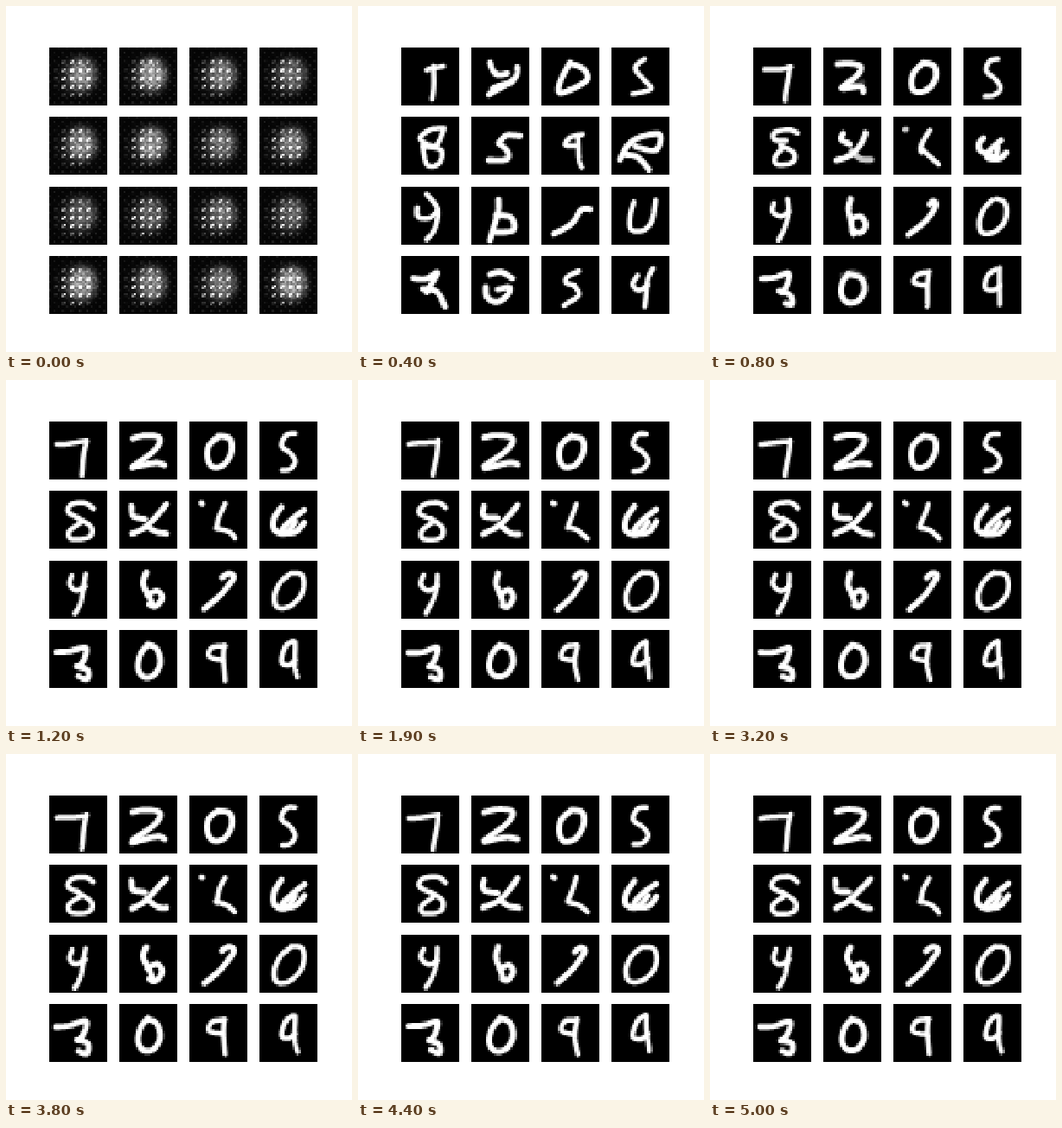
Animation of 400 by 400 pixels, one loop 5600 ms. Source, as an HTML page with a canvas:

```html
<!DOCTYPE html>
<html lang="en">
<head>
<meta charset="utf-8">
<title>Digits taking shape</title>
<style>
  html, body { margin: 0; width: 100%; height: 100%; overflow: hidden; background: #fff; }
  canvas { display: block; width: 400px; height: 400px; }
</style>
</head>
<body>
<canvas id="stage" width="400" height="400"></canvas>
<script>
const LOOP = 5600, STEP = 100, LAST = 50;
const SIDE = 67, PITCH_X = 81, PITCH_Y = 80.4, LEFT = 50, TOP = 48;
const CELLS = 28, SAMPLES = 24;
const FORMED = 4, SETTLED = 14;

// Each digit starts as a rough scrawl and settles into a clean one; "|" splits strokes.
const DIGITS = [
  digit(6, '29,26 38,24 48,21|38,22 36,60', '9,26 24,25 43,23|43,22 40,42 37,62'),
  digit(7, '22,18 28,30 42,30|53,22 48,38 20,55|24,48 46,40', '15,19 30,16 47,19 42,32 15,52|15,54 42,48 53,50'),
  digit(7, '33,18 48,24 53,36 40,46 22,53 22,40 33,18', '34,17 47,20 49,34 41,49 28,53 21,44 22,28 34,17'),
  digit(6, '38,13 28,24 38,38 45,48 24,53', '41,14 31,15 25,27 36,36 42,46 36,55 26,57'),
  digit(6, '50,14 34,15 21,25 40,33 50,14|24,34 46,38 44,54 30,56 24,34', '51,20 42,14 26,16 21,25 34,32|34,32 48,42 46,54 26,56 23,47 36,37'),
  digit(7, '56,22 42,21 32,30|32,30 42,40 40,50 20,50', '14,18 15,29 30,32|54,16 44,28 30,42 14,50|32,40 44,48 55,50'),
  digit(6, '48,20 34,24 27,33 40,33|42,22 43,44 47,58', '41,15 35,29 31,43|31,43 44,47 53,55|13,14 15,15'),
  digit(7, '10,50 18,34 32,24 56,20 52,38 28,34|16,44 30,46 43,62', '26,18 17,32 17,46 30,50 42,36|52,22 34,36 26,48 42,48 52,36'),
  digit(6, '18,24 20,34 32,36 42,28|30,8 42,26 38,50 30,61', '26,17 23,27 31,34 42,29|42,16 40,32 36,48 29,61'),
  digit(7, '32,14 30,30 22,62|28,33 46,36 49,50 28,52', '31,14 28,26 34,40 38,52|33,39 44,34 49,43 42,53 35,51'),
  digit(7, '56,26 46,27 36,42 14,54', '38,19 46,14 51,18 46,27 34,42 18,56'),
  digit(6, '26,18 22,34 23,49 36,50 46,40 51,16', '36,14 24,24 17,40 20,54 34,54 48,42 52,26 48,15 36,14'),
  digit(7, '14,25 28,26 42,20 30,42|24,38 42,42 50,58', '8,26 24,25 42,20 40,33 34,42|32,42 44,46 44,57 34,54'),
  digit(7, '16,36 18,48 30,54 42,46 44,36 30,38|22,22 34,18 48,26', '33,17 24,28 21,44 28,54 40,52 48,38 44,22 33,17'),
  digit(6, '44,18 30,24 28,30 38,34|38,34 43,46 26,58', '41,18 27,20 23,31 38,35|41,18 39,36 42,58'),
  digit(6, '30,22 24,32 32,40 42,34|48,14 42,30 38,58', '39,13 30,20 25,37 34,40 42,34|41,14 41,36 44,55')
];

function digit(pen, rough, clean) {
  const read = text => text.split('|').map(part =>
    smooth(part.split(' ').map(p => p.split(',').map(Number))));
  return { pen, rough: read(rough), clean: read(clean) };
}

// Catmull-Rom curve sampled at a fixed count, so that strokes can be blended.
function smooth(pts) {
  const n = pts.length - 1;
  const at = i => pts[Math.max(0, Math.min(n, i))];
  return Array.from({ length: SAMPLES + 1 }, (_, k) => {
    const u = k / SAMPLES * n, i = Math.min(n - 1, Math.floor(u)), t = u - i;
    return [0, 1].map(d => {
      const [a, b, c, e] = [at(i - 1)[d], at(i)[d], at(i + 1)[d], at(i + 2)[d]];
      return b + t / 2 * (c - a + t * (2 * a - 5 * b + 4 * c - e + t * (3 * (b - c) + e - a)));
    });
  });
}

const clamp = v => Math.max(0, Math.min(1, v));
const mix = (a, b, t) => a + (b - a) * t;

function random(seed) {
  const s = Math.sin(seed * 12.9898) * 43758.5453;
  return s - Math.floor(s);
}

const ctx = document.getElementById('stage').getContext('2d');
const cell = document.createElement('canvas');
cell.width = cell.height = CELLS;
const pen = cell.getContext('2d');

// Slanted dots every four cells, with a grey haze to their upper right.
function lattice(tile, strength) {
  const gain = .9 + .3 * random(tile + 1), haze = .25 + .3 * random(tile + 40);
  const bump = (dx, dy) => Math.exp(-((dx * dx + dy * dy) ** 2));
  for (let y = 0; y < CELLS; y++) for (let x = 0; x < CELLS; x++) {
    const slant = (x + y) % 4 === 1 && x % 4 > 1;
    const core = x % 4 > 1 && y % 4 > 1;
    const dot = (slant ? 1 : core ? .4 : .08) * bump((x - 12.5) / 8.5, (y - 14) / 9);
    const mist = haze * bump((x - 15.5) / 7, (y - 12.5) / 8);
    const weave = (x + y) % 4 === 0 && y % 2 === 0 ? .1 : .02;
    const light = (dot * gain + mist + weave) * mix(.7, 1.2, random(tile * 911 + y * 31 + x));
    pen.fillStyle = `rgba(255,255,255,${clamp(light) * strength})`;
    pen.fillRect(x, y, 1, 1);
  }
}

// A slow ripple keeps every stroke slightly alive.
function ripple(points, seed, step) {
  return points.map(([x, y], k) => {
    const phase = step * .5 + k * .25 + seed * 2.4;
    return [x + .6 * Math.sin(phase), y + .6 * Math.cos(phase * .8)];
  });
}

function drawDigit({ pen: width, rough, clean }, tile, step, formed) {
  const t = 1 - (1 - clamp((step - FORMED) / (SETTLED - FORMED))) ** 3;
  pen.save();
  pen.scale(CELLS / SIDE, CELLS / SIDE);
  pen.lineCap = pen.lineJoin = 'round';
  pen.strokeStyle = '#fff';
  pen.lineWidth = width;
  if (formed < 1) pen.filter = `blur(${2.8 * (1 - formed)}px)`;
  for (let i = 0; i < Math.max(rough.length, clean.length); i++) {
    const a = rough[i] || clean[i], b = clean[i] || rough[i];
    const presence = mix(rough[i] ? 1 : 0, clean[i] ? 1 : 0, t);
    const points = a.map((p, k) => p.map((v, d) => mix(v, b[k][d], t)));
    pen.globalAlpha = presence * Math.sqrt(formed);
    pen.beginPath();
    ripple(points, tile + i, step).forEach(p => pen.lineTo(...p));
    pen.stroke();
  }
  pen.restore();
}

function draw(step) {
  const formed = clamp(step / FORMED);
  ctx.fillStyle = '#fff';
  ctx.fillRect(0, 0, 400, 400);
  ctx.imageSmoothingEnabled = false;
  DIGITS.forEach((shape, i) => {
    pen.fillStyle = '#000';
    pen.fillRect(0, 0, CELLS, CELLS);
    if (formed < 1) lattice(i, (1 - formed) ** 2);
    if (formed > 0) drawDigit(shape, i, step, formed);
    const x = Math.round(LEFT + i % 4 * PITCH_X), y = Math.round(TOP + (i >> 2) * PITCH_Y);
    ctx.drawImage(cell, x, y, SIDE, SIDE);
  });
}

const start = performance.now();
let shown = -1;
function tick() {
  const time = (performance.now() - start) % LOOP;
  const step = Math.min(LAST, Math.floor(time / STEP));
  if (step !== shown) draw(shown = step);
  requestAnimationFrame(tick);
}
tick();
</script>
</body>
</html>
```
